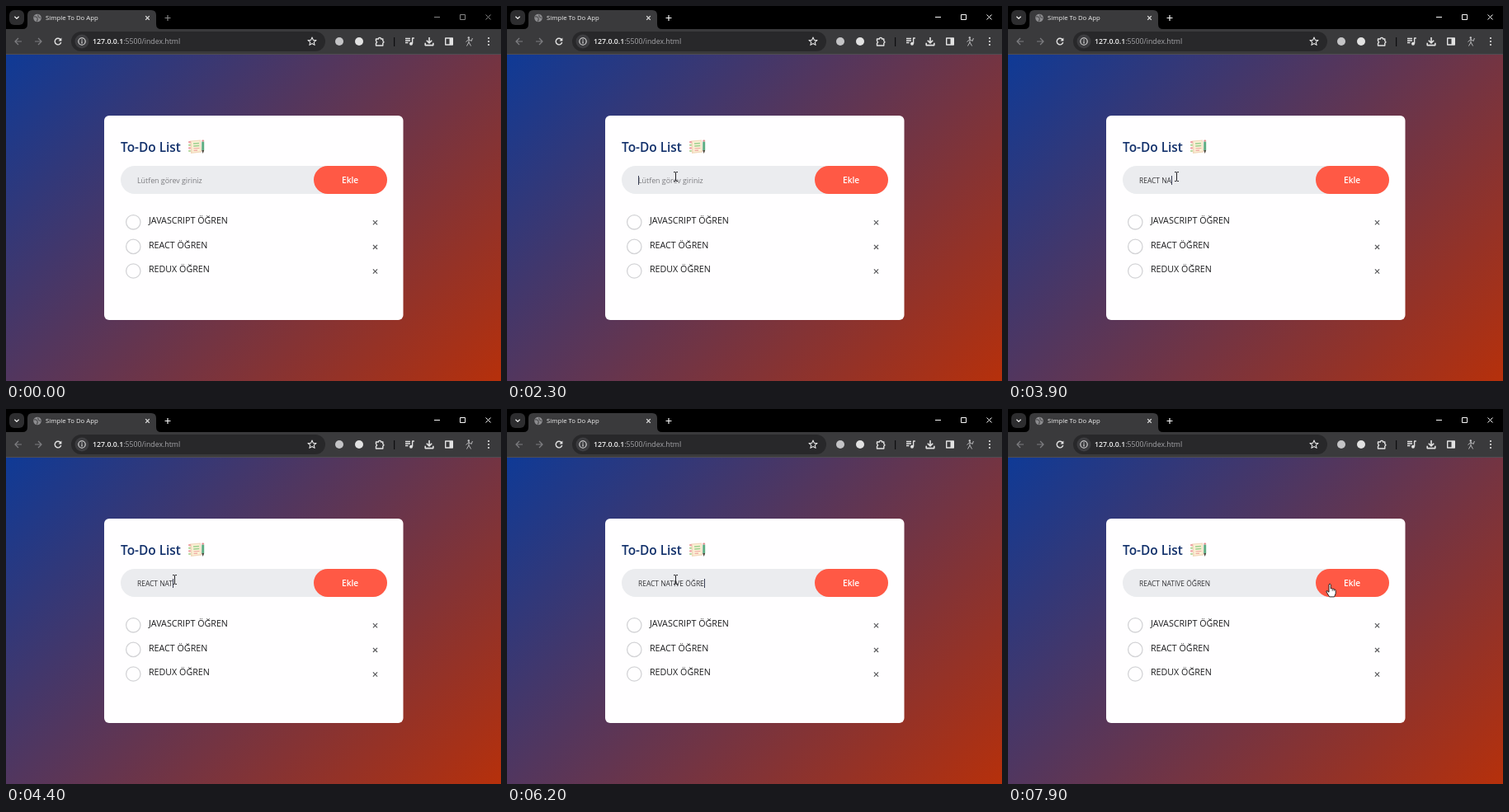
Recreate the animation shown at these times as an HTML page with a canvas. Size 600 by 455 pixels, loop 8 s.

```html
<!DOCTYPE html>
<html lang="tr">
<head>
<meta charset="utf-8">
<title>Simple To Do App</title>
<style>
  html, body { margin: 0; width: 100%; height: 100%; overflow: hidden; background: #000; }
  canvas { display: block; }
</style>
</head>
<body>
<canvas id="stage" width="600" height="455"></canvas>
<script>
const ctx = document.getElementById('stage').getContext('2d');
const LOOP = 8000, TICK = 100, BLINK = 530, FOCUS = 1200;
const SANS = '"Open Sans", "Noto Sans", sans-serif';
const ENTRY = 'REACT NATIVE ÖĞREN';
const INPUT_FONT = '8.43px ' + SANS;

// [time, characters typed so far]
const KEYS = [[2500, 1], [2900, 3], [3100, 4], [3400, 5], [3500, 6], [3700, 7], [3900, 8],
  [4400, 9], [4700, 10], [4800, 13], [5500, 14], [5900, 15], [6100, 16], [6200, 17], [6310, 18]];

function text(str, x, y, font, color) {
  ctx.font = font.includes('px ') ? font : font + 'px ' + SANS;
  ctx.fillStyle = color;
  ctx.fillText(str, x, y);
}

function box(x, y, w, h, r, color) {
  ctx.fillStyle = color;
  ctx.beginPath();
  ctx.roundRect(x, y, w, h, r);
  ctx.fill();
}

function disc(x, y, r, color) {
  ctx.fillStyle = color;
  ctx.beginPath();
  ctx.arc(x, y, r, 0, Math.PI * 2);
  ctx.fill();
}

function ring(x, y, r, color, w) {
  ctx.strokeStyle = color;
  ctx.lineWidth = w;
  ctx.beginPath();
  ctx.arc(x, y, r, 0, Math.PI * 2);
  ctx.stroke();
}

// Path given relative to (x, y)
function path(x, y, d, { fill, stroke, w = 1 }) {
  const p = new Path2D(d);
  ctx.save();
  ctx.translate(x, y);
  ctx.lineJoin = 'round';
  if (fill) { ctx.fillStyle = fill; ctx.fill(p); }
  if (stroke) { ctx.strokeStyle = stroke; ctx.lineWidth = w; ctx.stroke(p); }
  ctx.restore();
}

function drawTabs(focused) {
  const ui = focused ? '#f4f4f4' : '#858585';
  box(0, 0, 600, 28, 0, '#000');
  box(4, 5, 18, 18, 6, '#2d2d2f');
  path(13, 14, 'M-2.6-1.2L0 1.4 2.6-1.2', { stroke: '#e8e8e8', w: 1.3 });

  path(0, 0, 'M20 28Q26 28 26 22V11Q26 5 32 5H176Q182 5 182 11V22Q182 28 188 28Z', { fill: '#3a3a3c' });
  disc(38, 14.5, 4.8, '#8c8c8f');
  path(38, 14.5, 'M-4-1.5Q-1-2 0 0T-1 4M1-4Q0-1 4 0', { stroke: '#4a4a4c', w: 1.1 });
  text('Simple To Do App', 48, 17.3, '7.75', '#f0f0f0');
  path(171.5, 14.5, 'M-2.3-2.3L2.3 2.3M2.3-2.3L-2.3 2.3', { stroke: '#e4e4e4', w: 1.2 });
  path(196, 14.5, 'M-3.5 0H3.5M0-3.5V3.5', { stroke: ui, w: 1.2 });

  path(522.5, 13.5, 'M-3.5 0H3.5', { stroke: ui });
  path(553.5, 13.5, 'M-3-3H3V3H-3Z', { stroke: ui });
  path(584.5, 13.5, 'M-3-3L3 3M3-3L-3 3', { stroke: ui });
}

function drawToolbar() {
  const ui = '#e2e2e2', dim = '#7d7d80';
  box(0, 28, 600, 31, 0, '#3a3a3c');
  box(0, 58, 600, 1, 0, '#504d52');
  path(15, 43, 'M4 0H-4M0-4L-4 0 0 4', { stroke: dim, w: 1.2 });
  path(39, 43, 'M-4 0H4M0-4L4 0 0 4', { stroke: dim, w: 1.2 });
  path(63, 43, 'M3.2-2A3.8 3.8 0 1 0 3.7 1', { stroke: ui, w: 1.4 });
  path(63, 43, 'M4.4-4.5V-.6H.5Z', { fill: ui });

  box(79, 31, 308, 24, 12, '#28282a');
  disc(92, 43, 8.5, '#3d3d40');
  ring(92, 43, 4.2, ui, 1.1);
  path(92, 43, 'M0-.6V2.4M0-2.4V-1.3', { stroke: ui, w: 1.1 });
  const host = '127.0.0.1', font = '8.75px ' + SANS;
  text(host, 105, 46.3, '600 8.75px ' + SANS, '#f2f2f2');
  const hostWidth = ctx.measureText(host).width;
  text(':5500/index.html', 105 + hostWidth, 46.3, font, '#a6a6aa');
  path(371, 43, 'M0-5L1.4-1.6 5-1.4 2.2.9 3.1 4.4 0 2.5-3.1 4.4-2.2.9-5-1.4-1.4-1.6Z', { stroke: ui, w: 1.1 });

  disc(404, 43, 5, '#c4c4c6');
  disc(428, 43, 5, '#e2e2e2');
  path(453, 43.5, 'M-4.5-3.5H-1.5V-4.2Q0-6 1.5-4.2V-3.5H3.8V-1Q6 .2 3.8 1.5V4.5H-4.5V1.7Q-2.4.4-4.5-1Z', { stroke: ui, w: 1.4 });
  box(470, 38, 1.2, 11, 0, '#0e0e0f');
  path(489, 43, 'M-5-3.5H1M-5-1H1M-5 1.5H-1.5M3.6 2.5V-4H5.8', { stroke: ui, w: 1.4 });
  disc(2 + 489, 45.8, 2, ui);
  path(513, 43, 'M0-5V1.5M-3.2-1.3L0 1.9 3.2-1.3M-4.8 1.8V4.6H4.8V1.8', { stroke: ui, w: 1.6 });
  path(537, 43, 'M-4.3-4H4.3V4H-4.3Z', { stroke: ui, w: 1.4 });
  box(537.5, 39, 4, 8, 0, ui);
  disc(560.8, 38.5, 1.2, '#c8c8ca');
  path(561, 43, 'M0-3.4V1L-2.5 5.5M0 1L2.6 5.5M-3.5.5L0-2.5 3.2-.5 4.4-4', { stroke: '#b8b8ba', w: 1 });
  for (const y of [39, 43, 47]) disc(585, y, 1.1, ui);
}

function drawPage() {
  // 135deg CSS gradient over a 600 x 396 area
  const half = (600 + 396) / 4, cx = 300, cy = 257;
  const g = ctx.createLinearGradient(cx - half, cy - half, cx + half, cy + half);
  g.addColorStop(0, '#0f3a96');
  g.addColorStop(1, '#b6300b');
  box(0, 59, 600, 396, 0, g);
  box(119, 133, 362.5, 248, 6, '#fffeff');
}

function drawNotes() {
  path(221, 162, 'M2 1.5L15 .5 16 15.5 3 17Z', { fill: '#f2d9bd' });
  path(221, 162, 'M4 2.5L14 1.8 14.8 14.3 4.8 15.5Z', { fill: '#fbf1d6' });
  path(221, 162, 'M6 5L13 4.5M6.2 8L13.2 7.5', { stroke: '#9ccf8f', w: 1.3 });
  path(221, 162, 'M6.4 11L13.4 10.5M6.5 13.5L11 13.1', { stroke: '#efa3a0', w: 1.2 });
  for (let i = 0; i < 4; i++) box(221, 164 + i * 3.6, 3, 2.3, 1, i % 2 ? '#b9d9a0' : '#ee9ea2');
  box(237.2, 164.5, 3, 10.5, 0, '#5fae84');
  box(237.2, 162.5, 3, 2, 1, '#e58f92');
  path(237.2, 175, 'M0 0H3L1.5 4Z', { fill: '#4a4238' });
}

function drawCard(typed) {
  text('To-Do List', 139, 176.5, '600 15.4px ' + SANS, '#12306b');
  drawNotes();

  box(139, 194, 323, 34, 17, '#ebecef');
  if (typed) text(ENTRY.slice(0, typed), 159, 214.5, INPUT_FONT, '#333336');
  else text('Lütfen görev giriniz', 159, 214.5, '8.85', '#7b7b7f');
  box(373, 194, 89, 34, 17, '#ff5945');
  text('Ekle', 407, 214.8, '600 10.2px ' + SANS, '#fff');

  ['JAVASCRIPT', 'REACT', 'REDUX'].forEach((name, i) => {
    const y = 262.3 + i * 29.6;
    ring(154.3, y, 8.7, '#d3d3d6', 1.3);
    text(name + ' ÖĞREN', 173, y + 1.7, '10.7', '#1c1c1e');
    path(447.5, y + .5, 'M-2.6-2.6L2.6 2.6M2.6-2.6L-2.6 2.6', { stroke: '#555558', w: 1.1 });
  });
}

function drawCaret(t, typed, lastKey) {
  if (t < FOCUS || Math.floor((t - lastKey) / BLINK) % 2) return;
  ctx.font = INPUT_FONT;
  const x = 159 + ctx.measureText(ENTRY.slice(0, typed)).width;
  box(Math.round(x), 206, 1, 11, 0, '#3a3f55');
}

function drawIBeam(x, y) {
  path(x, y, 'M-2.5-5.5H-.8L0-5 .8-5.5H2.5M0-5V5M-2.5 5.5H-.8L0 5 .8 5.5H2.5', { stroke: '#222226', w: 1 });
}

function drawArrow(x, y) {
  path(x, y, 'M0 0V11.5L2.7 9 4.4 13 6.2 12.2 4.5 8.4H8Z', { fill: '#fff', stroke: '#111', w: .8 });
}

function drawHand(x, y) {
  path(x - 2, y - 7, 'M-1 1q1-2 2.2 0v5q2-.6 2 .3q2-.4 2 .6q2 0 2 1.5v3.5l-1.6 4h-6l-3.6-6q-.6-1.4 1-1.2l2 1.6z',
    { fill: '#fff', stroke: '#111', w: .9 });
  path(x - 2, y - 7, 'M3.2 6.5v2.5M5.2 7v2', { stroke: '#111', w: .6 });
}

function drawPointer(t) {
  if (t < FOCUS + TICK) return;
  if (t < 7400) return drawIBeam(204.5, 207);
  const k = (t - 7400) / 500, e = k * k * (3 - 2 * k);
  const x = 201 + 191 * e, y = 173 + 46 * e;
  const overInput = y > 194 && x < 373;
  if (x >= 373) drawHand(x, y);
  else if (overInput || x < 213) drawIBeam(x, y);
  else drawArrow(x, y);
}

function render(now) {
  const t = Math.floor((now % LOOP) / TICK) * TICK;
  let typed = 0, lastKey = FOCUS;
  for (const [time, count] of KEYS) if (t >= time) [lastKey, typed] = [time, count];

  drawTabs(t >= FOCUS);
  drawToolbar();
  drawPage();
  drawCard(typed);
  drawCaret(t, typed, lastKey);
  drawPointer(t);
}

const start = performance.now();
function frame() {
  render(performance.now() - start);
  requestAnimationFrame(frame);
}
frame();
</script>
</body>
</html>
```
